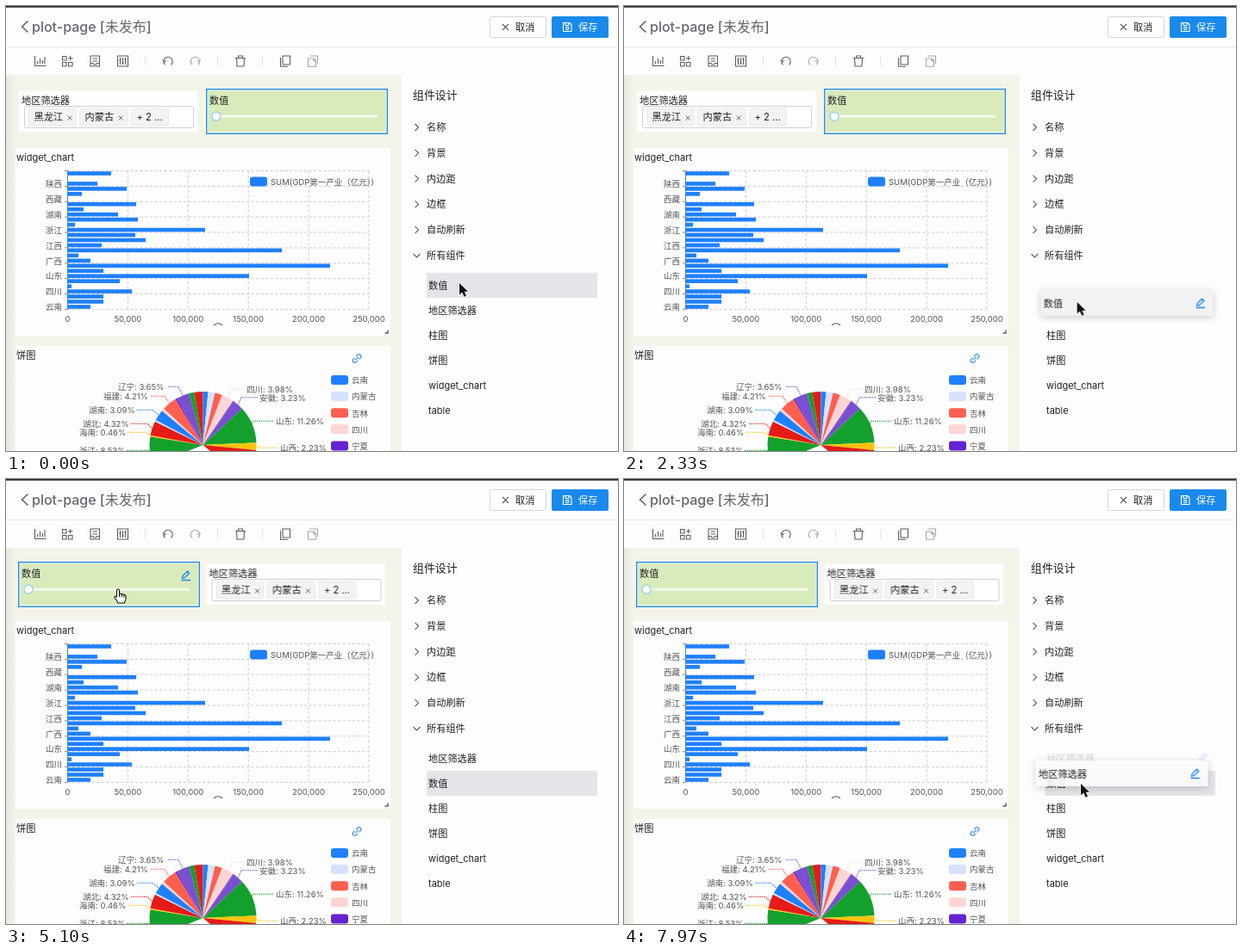
These frames come from a looping animation (710x517 px, 8 s). An HTML page:

```html
<!DOCTYPE html>
<html lang="zh-CN">
<head>
<meta charset="utf-8">
<title>组件设计</title>
<style>
html, body { margin: 0; width: 710px; height: 517px; overflow: hidden; background: #fdfdfe; }
svg { display: block; font: 11.2px Inter, "Noto Sans CJK SC", "Noto Sans CJK", sans-serif; }
text { fill: #202124; white-space: pre; }
.title { font-size: 16px; font-weight: 500; fill: #65676b; }
.head { font-size: 12.9px; }
.bold { font-weight: 500; }
.small { font-size: 9.5px; fill: #555; }
.white { fill: #fff; }
.line { fill: none; stroke: #5c5d61; stroke-width: 1.1; }
.pale { stroke: #a6a7aa; }
.blue { stroke: #1f87ee; stroke-width: 1.3; }
.moving { animation: 8s infinite ease-in-out; }
#filter, #slider { animation: 8s infinite step-end; }
#filter { animation-name: filter; }
#slider { animation-name: slider; }
#value-row { animation-name: value-row; }
#area-row { animation-name: area-row; }
#value-drag { animation-name: value-drag; }
#area-drag { animation-name: area-drag; }
#cursor { animation-name: cursor; }
@keyframes filter { 0% { transform: none } 43.5%, 100% { transform: translateX(217.5px) } }
@keyframes slider { 0% { transform: none } 43.5%, 100% { transform: translateX(-218px) } }
@keyframes value-row {
  0%, 24% { opacity: 1; transform: none }
  27% { opacity: 0; transform: none }
  43.49% { opacity: 0; transform: none }
  43.5%, 100% { opacity: 1; transform: translateY(29px) }
}
@keyframes area-row {
  0%, 28% { opacity: 1; transform: translateY(29px) }
  31%, 96% { opacity: 1; transform: none }
  99.5%, 100% { opacity: .18; transform: none }
}
@keyframes value-drag {
  0%, 24% { transform: translate(488px, 310px) }
  33%, 100% { transform: translate(481px, 342px) }
}
@keyframes area-drag {
  0%, 94% { transform: translate(488px, 310px) }
  99%, 100% { transform: translate(477.5px, 327px) }
}
@keyframes cursor {
  0% { transform: translate(526px, 322px) }
  19%, 24% { transform: translate(525px, 321px) }
  33%, 44% { transform: translate(526px, 358px) }
  47%, 56% { transform: translate(527px, 346px) }
  63%, 68% { transform: translate(130px, 128px) }
  73%, 79% { transform: translate(314px, 134px) }
  87%, 94% { transform: translate(529px, 332px) }
  99%, 100% { transform: translate(530px, 354px) }
}
</style>
</head>
<body>
<script>
const BLUE = '#1f80ff', LAVENDER = '#d5e2ff', CORAL = '#ff5f4e', PINK = '#ffd5d3', VIOLET = '#6522d2',
  PURPLE = '#7950d0', GREEN = '#13a02c', YELLOW = '#f9c40d', RED = '#e51b17';

const text = (x, y, s, cls = '', more = '') => `<text x="${x}" y="${y}" class="${cls}" ${more}>${s}</text>`;
const rect = (x, y, w, h, fill, more = '') => `<rect x="${x}" y="${y}" width="${w}" height="${h}" fill="${fill}" ${more}/>`;
const path = (d, cls = 'line', more = '') => `<path d="${d}" class="${cls}" ${more}/>`;
const at = (x, y, body) => `<g transform="translate(${x} ${y})">${body}</g>`;
const group = (id, body, cls = 'moving') => `<g id="${id}" class="${cls}">${body}</g>`;

// Wraps content that is visible only in the given percent ranges of the loop.
const rules = [];
function during(ranges, body) {
  const name = 'show' + rules.length;
  const steps = ranges.map(([a, b]) => `${a}%{opacity:1}` + (b < 100 ? `${b}%{opacity:0}` : '')).join('');
  const start = ranges[0][0] ? '0%{opacity:0}' : '';
  const end = ranges.at(-1)[1] < 100 ? 0 : 1;
  rules.push(`@keyframes ${name}{${start}${steps}100%{opacity:${end}}}`);
  return `<g style="animation:${name} 8s infinite step-end">${body}</g>`;
}

const pencil = (x, y) => at(x, y, path('M-4 3.2L-3.4.6L2-4.8L4.2-2.6L-1.2 2.7ZM-5 5.5H5.5', 'line blue'));

function header() {
  const undo = 'M-3.5 4.3A5.2 5.2 0 1 1 3.5 4.3M-6.2-1.5L-4.6 1.2L-2-.6';
  const redo = 'M3.5 4.3A5.2 5.2 0 1 0-3.5 4.3M6.2-1.5L4.6 1.2L2-.6';
  const icons = [
    [39.5, 'M-6-6V5.5H7M-3 3V0M0 3V-3M3 3V-1M5.5 3V-5'],
    [71, 'M-5.5-5.5H-1V-1H-5.5ZM1.5 1.5H6V6H1.5ZM-5.5 1.5H-1V6H-5.5ZM3.7-6V-.5M1-3.2H6.5'],
    [103, 'M-5-6H5.5V6H-5ZM-2.5-3H3M-2.5 0H3M-5 2.5H-2L-1 4H1.5L2.5 2.5H5.5'],
    [135.5, 'M-6-6H6V6H-6ZM-3-4V4M0-4V4M3-4V4M-4.2-1H-1.8M-1.2 2H1.2M1.8-2H4.2'],
    [188, undo], [219.5, redo, 'pale'],
    [272, 'M-6-3.5H6M-2.5-3.5V-6H2.5V-3.5M-4.5-3.5L-4 6H4L4.5-3.5'],
    [324, 'M-3-6H5.5V4H-3ZM-5.5-4V6.2H3'],
    [356, 'M-3.5-6H5.5V3M-5.5-3H1L3.5-.5V6.2H-5.5ZM.8-3V0H3.5', 'pale'],
  ];
  return rect(0, 0, 710, 80, '#fdfdfe') + rect(0, 0, 710, 1.8, '#303137') + rect(0, 47, 710, 1, '#ebebee') +
    path('M25.5 17.5L18.5 24L25.5 30.5', 'line', 'style="stroke-width:1.5"') +
    text(30, 30, 'plot-page [未发布]', 'title') +
    rect(561.5, 12.5, 65, 24, '#fff', 'rx="2" stroke="#d5d6d9"') +
    path('M576 21L583 28M583 21L576 28') + text(591, 28.5, '取消') +
    rect(633, 12, 66, 25, '#1989eb', 'rx="2"') +
    path('M646.5 19.5H654L656 21.5V29.5H646.5ZM649 19.5V22.5H653V19.5', 'line', 'style="stroke:#fff"') +
    '<circle cx="651.2" cy="26" r="1.6" class="line" style="stroke:#fff"/>' + text(664, 28.5, '保存', 'white') +
    [161, 245, 297].map(x => rect(x, 59, 1, 10, '#e2e2e5')).join('') +
    icons.map(([x, d, cls = '']) => at(x, 64, path(d, 'line ' + cls))).join('');
}

function filterCard() {
  const tag = (x, w, s, cross) => rect(x + .5, 119.5, w, 19, '#f3f3f4', 'stroke="#eaeaec" rx="1.5"') + text(x + 6.5, 133, s) +
    (cross ? path(`M${cross - 2.4} 127.6l5 5m0-5l-5 5`, 'line', 'style="stroke-width:.9"') : '');
  return group('filter', rect(15, 98.5, 207.5, 47.5, '#fefefe') +
    during([[72, 80]], rect(14.5, 96.5, 210, 52, 'none', 'stroke="#1889ec" stroke-dasharray="1.4 1.4"')) +
    rect(21.5, 116.5, 196, 25, '#fff', 'stroke="#cfcfd5" rx="1"') + text(18, 114, '地区筛选器') +
    tag(26, 55, '黑龙江', 74) + tag(85, 56, '内蒙古', 133) + tag(145, 43, '+ 2 ...') +
    during([[72, 80]], pencil(208.5, 112)), '');
}

const sliderCard = () => group('slider',
  rect(232.7, 96.7, 209.6, 51.6, '#f0f6e6', 'stroke="#1889ec" stroke-width="1.3"') +
  rect(234.5, 98.5, 206, 47.5, '#d9eabb') + text(236, 114, '数值') +
  rect(239, 126.7, 192.5, 3, '#f5f7ee', 'rx="1.5"') +
  '<circle cx="244" cy="128.3" r="5" fill="#fff" stroke="#9bd2f4" stroke-width="1.4"/>' +
  during([[62, 80]], pencil(426.5, 112)), '');

function barChart() {
  const ends = [122, 72, 106, 140, 88, 72, 151, 90, 130, 153, 80, 231, 150, 162, 111, 320, 84, 98, 376, 113, 282, 132, 76, 146, 113, 113, 98];
  const names = ['陕西', '西藏', '湖南', '浙江', '江西', '广西', '山东', '四川', '云南'];
  const left = 71.5, top = 191.5, band = 5.96, bottom = top + 27 * band;
  let out = rect(11, 165, 435, 218, '#fdfdfe') + text(12, 180, 'widget_chart', '', 'font-size="11"');
  const grid = 'stroke="#ccccd1" stroke-dasharray="3.2 2.4"';
  for (let k = 0; k < 6; k++) {
    const x = left + k * 69.9;
    if (k) out += `<path d="M${x} ${top}V${bottom}" ${grid}/>`;
    out += text(x, 367, k ? k * 50 + ',000' : '0', 'small', 'text-anchor="middle"');
  }
  for (let k = 0; k < 10; k++) {
    const y = top + k * 3 * band;
    out += `<path d="M${left} ${y}H421" ${grid}/><path d="M68 ${y}H${left}" stroke="#888"/>`;
  }
  out += `<path d="M${left} ${top}V${bottom}" stroke="#8a8b90"/>`;
  names.forEach((name, i) => out += text(65, 210 + i * 17.9, name, 'small', 'text-anchor="end"'));
  ends.forEach((end, i) => out += rect(71, top + i * band + .7, end - 71, 4.6, BLUE));
  return out + rect(283, 198.5, 20, 11, BLUE, 'rx="3"') + text(307, 207.8, 'SUM(GDP第一产业（亿元）)', 'small') +
    path('M241 371Q246 366.5 251 371') + path('M439.5 380H443V376.5', 'line', 'style="stroke-width:1.5"');
}

function pieChart() {
  const cx = 228.5, cy = 510, r = 62;
  const slices = [
    [-112, GREEN], [-81, YELLOW], [-79.5, RED], [-64, LAVENDER], [-62, BLUE], [-50, PINK], [-47, CORAL],
    [-31, VIOLET], [-29, PURPLE], [-15, GREEN], [-9.3, RED], [0, BLUE], [5.6, LAVENDER], [13, CORAL],
    [21, PINK], [34.4, VIOLET], [35.2, PURPLE], [47, GREEN], [87.5, YELLOW], [95.5, RED], [130],
  ];
  const rim = deg => {
    const a = deg * Math.PI / 180;
    return (cx + r * Math.sin(a)).toFixed(2) + ' ' + (cy - r * Math.cos(a)).toFixed(2);
  };
  // name, text x, baseline, line start, bend, slice angle, colour
  const labels = [
    ['辽宁: 3.65%', 130, 446, 188, 200, -22, PURPLE], ['福建: 4.21%', 113, 457, 168, 184, -39, CORAL],
    ['湖南: 3.09%', 96, 473, 152, 170, -56, BLUE], ['湖北: 4.32%', 89, 489, 145, 164, -72, RED],
    ['海南: 0.46%', 85, 499, 141, 163, -80, YELLOW], ['浙江: 8.53%', 85, 520, 140, 161, -96, GREEN],
    ['四川: 3.98%', 279, 449, 276, 262, 28, PINK], ['安徽: 3.23%', 294, 458.5, 292, 273, 41, PURPLE],
    ['山东: 11.26%', 313, 486, 310, 286, 67, GREEN], ['山西: 2.23%', 318, 517, 315, 294, 91, YELLOW],
  ];
  const legend = [['云南', BLUE], ['内蒙古', LAVENDER], ['吉林', CORAL], ['四川', PINK], ['宁夏', VIOLET]];
  return rect(11, 395, 435, 122, '#fdfdfe') + text(12, 410, '饼图', 'bold') +
    at(407, 409.5, '<g transform="rotate(-45)">' + path('M-1-2.4H-3.5A2.4 2.4 0 0 0-3.5 2.4H-1M1-2.4H3.5A2.4 2.4 0 0 1 3.5 2.4H1M-2.7 0H2.7', 'line blue', 'style="stroke-width:1"') + '</g>') +
    slices.slice(0, -1).map(([a, color], i) =>
      `<path d="M${cx} ${cy}L${rim(a)}A${r} ${r} 0 0 1 ${rim(slices[i + 1][0])}Z" fill="${color}"/>`).join('') +
    labels.map(([s, x, y, from, bend, a, color]) => text(x, y, s, 'small') +
      path(`M${from} ${y - 3.7}H${bend}L${rim(a)}`, 'line', `style="stroke:${color};stroke-dasharray:1.5 1"`)).join('') +
    legend.map(([s, color], i) => rect(377, 429 + i * 19.1, 20, 11, color, 'rx="3"') +
      text(317 + 84, 438.3 + i * 19.1, s, 'small')).join('');
}

function panel() {
  const sections = ['名称', '背景', '内边距', '边框', '自动刷新', '所有组件'];
  const rest = ['柱图', '饼图', 'widget_chart', 'table'];
  const drag = (s, fill, x) => rect(0, 0, 200, 30, fill, 'filter="url(#shadow)"') + text(x, 19.5, s) + pencil(185, 15);
  return rect(459, 80, 251, 437, '#fdfdfe') + text(472, 108, '组件设计', 'head') +
    sections.map((s, i) => at(476.5, 141 + i * 29.8,
      path(i < 5 ? 'M-2-4L2 0L-2 4' : 'M-4-2L0 2L4-2') + text(11.5, 4, s, 'bold')).replace('', '')).join('') +
    group('value-row', rect(488, 310, 198, 29, '#e5e5e9') + text(490, 329, '数值') +
      during([[45, 57], [86, 94]], pencil(671.5, 324))) +
    group('area-row', text(490, 329, '地区筛选器') + during([[30, 43.5], [86, 100]], pencil(671.5, 324))) +
    rest.map((s, i) => text(490, 387 + i * 28.9, s, '', i > 1 ? 'font-size="11"' : '')).join('') +
    during([[24, 43.5]], group('value-drag', drag('数值', '#f2f2f4', 3))) +
    during([[94, 100]], group('area-drag', drag('地区筛选器', 'rgba(253,253,254,.9)', 3.5)));
}

function cursor() {
  const ink = 'fill="#111" stroke="#fff" stroke-linejoin="round" paint-order="stroke"';
  const arrow = `<path d="M0 0V13.5L3.2 10.6L5.5 15.8L8 14.7L5.8 9.7H10Z" ${ink} stroke-width="1.6"/>`;
  const move = `<path d="M0-7.5L3-4H1V-1H4V-3L7.5 0L4 3V1H1V4H3L0 7.5L-3 4H-1V1H-4V3L-7.5 0L-4-3V-1H-1V-4H-3Z" ${ink} stroke-width="1.8"/>`;
  const hand = '<path d="M-1.5 1Q0-1 1.5 1V6Q3 4.5 4.3 6Q5.7 5 6.8 6.7Q8.7 6 9 8V11Q8.5 13.5 7.3 16H0Q-1.5 12.5-4 10.2Q-4-.2-1.5 9ZM1.5 6V9M4.3 6V9M6.8 6.7V9.5" fill="#fff" stroke="#111" stroke-width="1.1" stroke-linejoin="round"/>'.replace('-4-.2', '-4.2 7.2');
  return group('cursor', during([[0, 45], [57, 62], [80, 85], [94, 100]], arrow) +
    during([[45, 57], [85, 94]], move) + during([[62, 80]], hand));
}

const defs = `<defs>
  <linearGradient id="edge"><stop stop-color="#e7e8df"/><stop offset="1" stop-color="#f4f4eb"/></linearGradient>
  <filter id="shadow" x="-10%" y="-50%" width="120%" height="220%"><feDropShadow dx="0" dy="2" stdDeviation="4" flood-color="#000" flood-opacity=".2"/></filter>
</defs>`;

const scene = defs + rect(0, 80, 459, 437, '#f4f4eb') + rect(0, 80, 11, 437, 'url(#edge)') +
  header() + filterCard() + sliderCard() + barChart() + pieChart() + panel() + cursor();
const style = document.createElement('style');
style.textContent = rules.join('\n');
document.head.append(style);
document.body.innerHTML = `<svg width="710" height="517" viewBox="0 0 710 517">${scene}</svg>`;
</script>
</body>
</html>
```
